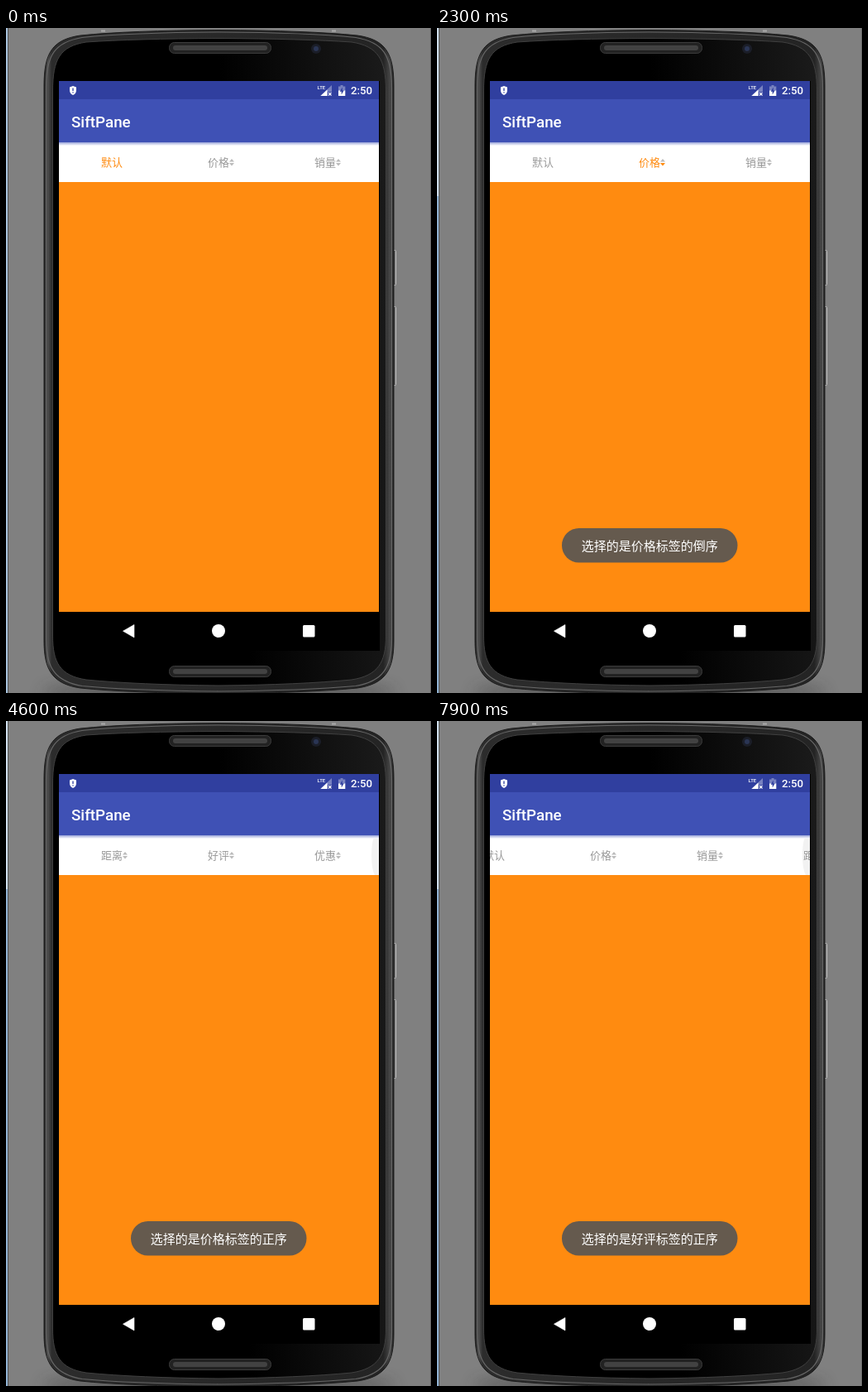
Recreate the animation shown at these times as an HTML page. Size 514 px wide and 803 px high, loop 8000 ms.

```html
<!DOCTYPE html>
<html lang="zh">
<head>
<meta charset="utf-8">
<title>Sort tabs</title>
<style>
  html, body { margin: 0; width: 100%; height: 100%; overflow: hidden; background: #808080; }
  svg { display: block; width: 514px; height: 803px; }
  text { font-family: "Noto Sans CJK SC", "Noto Sans CJK", sans-serif; }
  .roboto { font-family: Roboto, sans-serif; font-weight: 500; fill: #fff; }
  .tab { font-size: 13px; }
  .toast text { font-size: 15px; fill: #fff; }
</style>
</head>
<body>
<svg viewBox="0 0 514 803">
  <defs>
    <linearGradient id="rim">
      <stop offset="0" stop-color="#1c1c1c"/>
      <stop offset=".01" stop-color="#505050"/>
      <stop offset=".022" stop-color="#2c2c2c"/>
      <stop offset=".97" stop-color="#242424"/>
      <stop offset=".99" stop-color="#484848"/>
      <stop offset="1" stop-color="#1c1c1c"/>
    </linearGradient>
    <linearGradient id="face" x1="0" y1=".1" x2="1" y2="0">
      <stop offset=".5" stop-color="#000"/>
      <stop offset=".72" stop-color="#0c0c0c"/>
      <stop offset="1" stop-color="#1b1b1b"/>
    </linearGradient>
    <linearGradient id="shade" x2="0" y2="1">
      <stop offset="0" stop-color="#98a3d8"/>
      <stop offset="1" stop-color="#fff"/>
    </linearGradient>
    <filter id="blur" x="-20%" y="-50%" width="140%" height="200%"><feGaussianBlur stdDeviation="9"/></filter>
    <clipPath id="bar"><rect x="64" y="138" width="387" height="48"/></clipPath>
    <g id="grille">
      <rect x="197.5" y=".5" width="123" height="13" rx="6" fill="#222" stroke="#3c3c3c"/>
      <rect x="202" y="4" width="114" height="6" rx="3" fill="#424242"/>
    </g>
  </defs>

  <!-- backdrop -->
  <rect width="514" height="803" fill="#808080"/>
  <ellipse cx="257" cy="802" rx="215" ry="14" fill="#333" opacity=".45" filter="url(#blur)"/>
  <path id="edgeTop" d="M1 0V203" stroke-width="2"/>
  <path id="edgeLow" d="M1 203V803" stroke-width="2"/>
  <path d="M2.5 0V803" stroke="#505050"/>
  <path d="M513.5 0V803" stroke="#6c6c6c"/>

  <!-- phone -->
  <g fill="#666" stroke="#c4c4c4">
    <rect x="466" y="268.500" width="5.500" height="42" rx="1"/>
    <rect x="466" y="336.500" width="5.500" height="95" rx="1"/>
  </g>
  <path d="M115 3.500h5M394 3.500h5" stroke="#aaa" stroke-width="2"/>
  <path d="M46 70C46 30 56 14 90 9Q150 3 257 2.500Q365 3 425 9C459 14 469 30 469 70V740C469 775 459 792 425 797Q360 803 257 804Q150 803 90 797C56 792 46 775 46 740Z"
        fill="url(#rim)" stroke="#1c1c1c"/>
  <path d="M48.500 72C48.500 33 59 17 92 11.500Q150 5.500 257 5Q365 5.500 423 11.500C456 17 466.500 33 466.500 72V738C466.500 772 456 789 423 794.500Q360 800 257 801Q150 800 92 794.500C59 789 48.500 772 48.500 738Z"
        fill="none" stroke="#666" stroke-width="1.200"/>
  <path d="M56.500 76C56.500 38 65 22 97 17Q155 13 257 12.500Q360 13 418 17C450 22 459.500 38 459.500 76V734C459.500 766 450 782 418 787Q355 793 257 794Q160 793 97 787C65 782 56.500 766 56.500 734Z"
        fill="url(#face)" stroke="#404040"/>
  <use href="#grille" y="17"/>
  <use href="#grille" y="770"/>
  <circle cx="375" cy="25" r="6" fill="#1b1e28"/>
  <circle cx="375" cy="25" r="3" fill="#2a3554"/>

  <!-- screen -->
  <rect x="64" y="64" width="388" height="688"/>
  <rect x="64" y="64" width="387" height="22" fill="#303f9f"/>
  <rect x="64" y="86" width="387" height="52" fill="#3f51b5"/>
  <rect x="64" y="138" width="387" height="48" fill="#fff"/>
  <rect x="64" y="186" width="387" height="519" fill="#ff8b10"/>

  <path d="M81 70L85 71.600V75Q85 79.500 81 81Q77 79.500 77 75V71.600Z" fill="#fff"/>
  <path d="M81 72.500V76M81 77.300V78.600" stroke="#303f9f" stroke-width="1.300"/>
  <text class="roboto" x="376.500" y="74" font-size="6">LTE</text>
  <path d="M394 69V77H389V82H380Z" fill="#fff" opacity=".35"/>
  <path d="M388.500 74.500V82H380.500Z" fill="#fff"/>
  <path d="M390 78L393.500 81.500M393.500 78L390 81.500" stroke="#fff" stroke-width="1.100"/>
  <path d="M402 70.500H404.500V69H407.500V70.500H410.300V76H402Z" fill="#fff" opacity=".35"/>
  <path d="M402 75.500H410.300V82H402Z" fill="#fff"/>
  <path d="M406.800 71.500L403.700 76.800H405.700V80.500L408.700 75.300H406.800Z" fill="#303f9f"/>
  <text class="roboto" x="417" y="80" font-size="13.200">2:50</text>
  <text class="roboto" x="79" y="120" font-size="18.800">SiftPane</text>

  <g clip-path="url(#bar)">
    <path id="glow" d="M451 139H446Q442 145 442 162T446 186H451Z" fill="#f2f2f2"/>
    <g id="tabs"></g>
  </g>
  <rect x="64" y="138" width="387" height="4" fill="url(#shade)"/>

  <g id="toasts"></g>

  <path d="M155 720.500V736L141.500 728.200Z" fill="#fff" stroke="#fff" stroke-width=".6" stroke-linejoin="round"/>
  <circle cx="257" cy="728" r="8" fill="#fff"/>
  <rect x="359" y="721" width="14.500" height="14.500" rx="1.500" fill="#fff"/>
</svg>

<script>
const LOOP = 8000, STEP = 100, PAGE = 387;
const GREY = "#999", PALE = "#bbb", ORANGE = "#ff8b10";
const names = ["默认", "价格", "销量", "距离", "好评", "优惠"];

// [time, tab index, direction]
const taps = [[0, 0, ""], [1100, 1, "up"], [2300, 1, "down"], [5000, 4, "up"], [6300, 4, "down"]];

// [fade start, fade length, message]
const toasts = [
  [1195, 390, "选择的是价格标签的倒序"],
  [3165, 335, "选择的是价格标签的正序"],
  [5070, 400, "选择的是好评标签的倒序"],
  [6860, 420, "选择的是好评标签的正序"]
];

const $ = id => document.getElementById(id);
const ramp = (t, start, length) => Math.min(1, Math.max(0, (t - start) / length));

$("tabs").innerHTML = names.map((name, i) => `
  <g transform="translate(${115 + i * 129} 0)">
    <text class="tab" y="167">${name}</text>
    ${i ? '<path class="up" d="M26 161.500L29 158L32 161.500Z"/><path class="down" d="M26 163L29 166.500L32 163Z"/>' : ""}
  </g>`).join("");

$("toasts").innerHTML = toasts.map(([, , message]) => `
  <g class="toast">
    <rect x="151" y="604" width="212.500" height="41.500" rx="20.700" fill="#555" fill-opacity=".9"/>
    <text x="174.800" y="630.500">${message}</text>
  </g>`).join("");

const tabNodes = [...$("tabs").children];
const toastNodes = [...$("toasts").children];

// fling to the second page, later a drag back
function scrollAt(t) {
  const rest = 1 - ramp(t, 3865, 735);
  return PAGE * (1 - rest * rest) - 328 * ramp(t, 7700, 200);
}

function draw(t) {
  const [, active, direction] = taps.filter(([time]) => time <= t).pop();
  tabNodes.forEach((tab, i) => {
    for (const part of tab.children) {
      const arrow = part.tagName === "path";
      const lit = i === active && (!arrow || part.classList.contains(direction));
      part.setAttribute("fill", lit ? ORANGE : arrow ? PALE : GREY);
    }
  });
  $("tabs").setAttribute("transform", `translate(${-scrollAt(t)} 0)`);
  $("glow").setAttribute("opacity", t >= 4500 ? 1 : 0);

  toastNodes.forEach((node, i) => {
    const [start, length] = toasts[i];
    const next = toasts[i + 1];
    const gone = next ? ramp(t, next[0], next[1]) : 0;
    node.setAttribute("opacity", ramp(t, start, length) * (1 - gone));
  });

  const touched = t >= 1100;
  $("edgeTop").setAttribute("stroke", touched ? "#d3e2f0" : "#a9c4de");
  $("edgeLow").setAttribute("stroke", touched ? "#93b5d6" : "#a9c4de");
}

function frame() {
  draw(Math.floor(performance.now() % LOOP / STEP) * STEP);
  requestAnimationFrame(frame);
}
frame();
</script>
</body>
</html>
```
